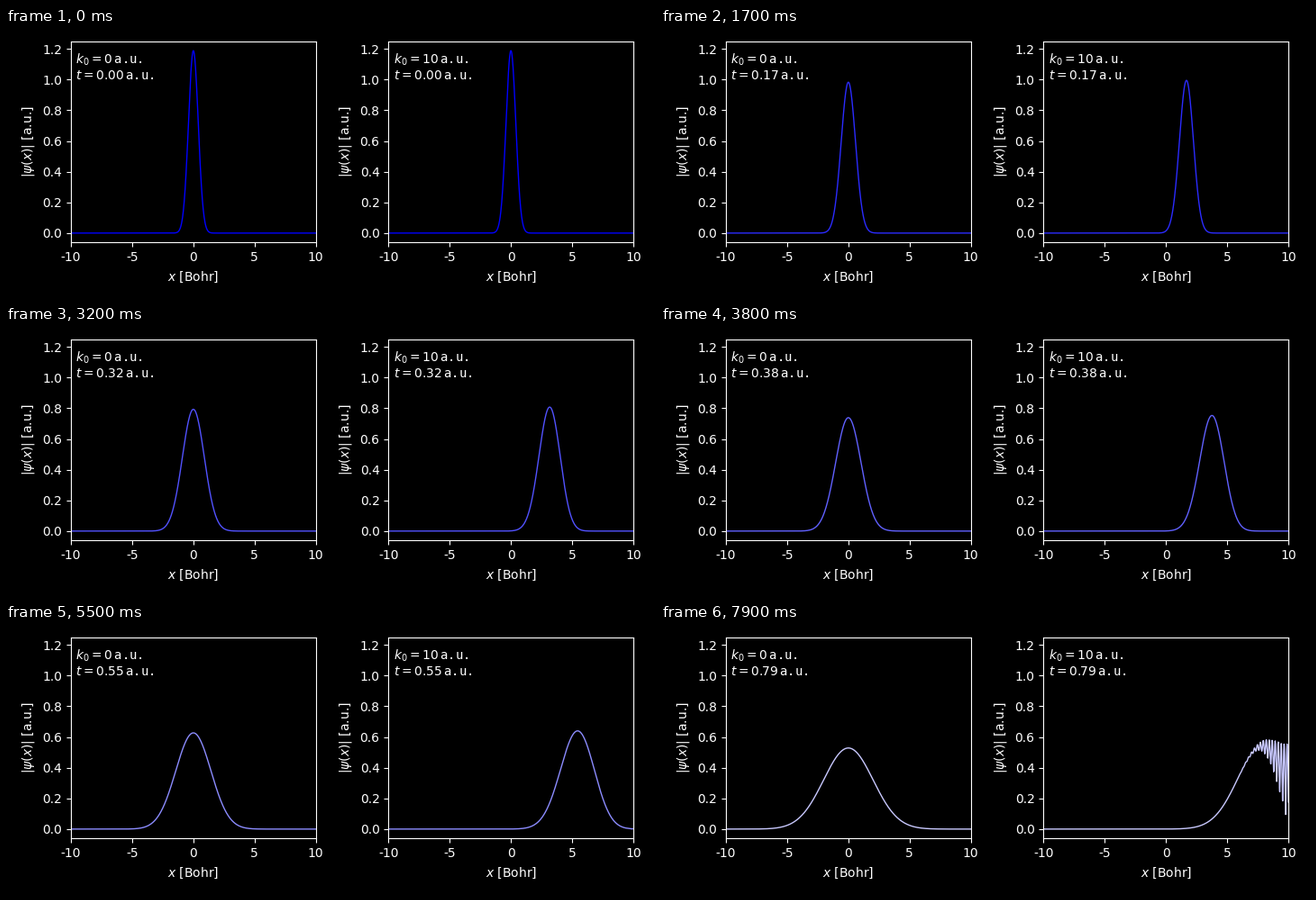
Animation of 720x300 px, one loop 8000 ms. Source, as a matplotlib script:

```python
import numpy as np
import matplotlib.pyplot as plt
from matplotlib.animation import FuncAnimation

plt.style.use("dark_background")
plt.rcParams.update({
    "font.family": "DejaVu Sans",
    "font.size": 10,
    "axes.unicode_minus": False,
    "axes.labelpad": 4.7,
})

FRAMES, INTERVAL = 80, 100
T_STEP = 0.01   # simulated time per frame
DT = 0.002      # Crank-Nicolson step
N = 801
PEAK = 2 ** 0.25

x = np.linspace(-10, 10, N)
dx = x[1] - x[0]

# Sine modes of the finite-difference Hamiltonian between hard walls
n = np.arange(1, N + 1)
modes = np.sqrt(2 / (N + 1)) * np.sin(np.pi * np.outer(n, n) / (N + 1))
energy = (1 - np.cos(np.pi * n / (N + 1))) / dx**2
omega = 2 / DT * np.arctan(energy * DT / 2)


def packet(k0):
    """Mode coefficients of a Gaussian wave packet."""
    return modes @ (PEAK * np.exp(-np.pi * x**2 + 1j * k0 * x))


def amplitude(coeffs, t):
    return np.abs(modes @ (coeffs * np.exp(-1j * omega * t)))


def note(ax, y, text=""):
    return ax.text(0.02, y, text, transform=ax.transAxes, va="baseline",
                   family="DejaVu Sans Mono")


def make_panel(ax, k0):
    line, = ax.plot(x, np.zeros(N), lw=1)
    ax.set_xlim(-10, 10)
    ax.set_ylim(-0.05 * PEAK, 1.05 * PEAK)
    ax.set_xlabel(r"$x$ [Bohr]")
    ax.set_ylabel(r"$|\psi(x)|$ [a.u.]")
    note(ax, 0.889, rf"$k_0={k0}\,$a.u.")
    return line, note(ax, 0.813), packet(k0)


fig, axes = plt.subplots(1, 2, figsize=(7.2, 3), dpi=100)
fig.subplots_adjust(left=72 / 720, right=696 / 720,
                    bottom=62 / 300, top=285 / 300, wspace=0.2966)
panels = [make_panel(ax, k0) for ax, k0 in zip(axes, (0, 10))]


def update(i):
    t = i * T_STEP
    for line, clock, coeffs in panels:
        line.set_ydata(amplitude(coeffs, t))
        line.set_color((t, t, 1))
        clock.set_text(rf"$t={t:.2f}\,$a.u.")
    return [artist for panel in panels for artist in panel[:2]]


anim = FuncAnimation(fig, update, frames=FRAMES, interval=INTERVAL,
                     repeat=True, repeat_delay=0)
plt.show()
```
